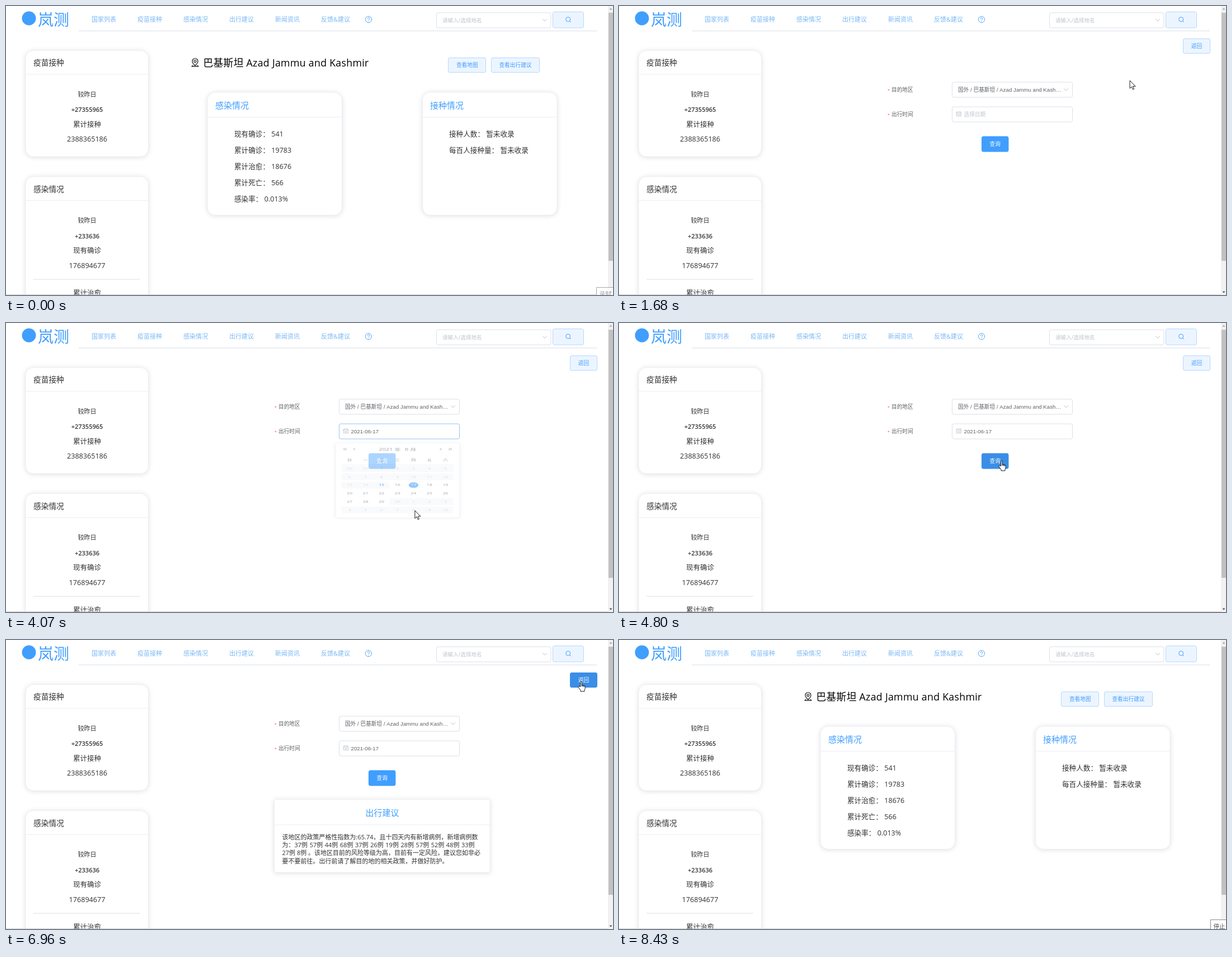
Recreate the animation shown at these times as an HTML page. Size 1085 by 516 pixels, loop 8500 ms.

```html
<!DOCTYPE html>
<html lang="zh-CN">
<head>
<meta charset="utf-8">
<style>
html, body { margin: 0; width: 100%; height: 100%; overflow: hidden; background: #fff; }
svg { display: block; width: 1085px; height: 516px; }
text { font-family: "Open Sans", "Noto Sans CJK SC", "Noto Sans CJK", sans-serif; white-space: pre; }
.arial { font-family: "Liberation Sans", "Noto Sans CJK SC", "Noto Sans CJK", sans-serif; }
.card { fill: #fff; stroke: #ebeef5; filter: drop-shadow(0 1.4px 4.3px rgba(0,0,0,.12)); }
.icon { fill: none; stroke-linecap: round; stroke-linejoin: round; }
</style>
</head>
<body>
<svg id="stage" viewBox="0 0 1085 516"></svg>
<script>
const LOOP = 8500;
const BLUE = '#409eff', HOVER = '#66b1ff', PRESS = '#3a8ee6';
const INK = '#303133', GREY = '#606266', PALE = '#c0c4cc', EDGE = '#dcdfe6', RULE = '#ebeef5';
const stage = document.getElementById('stage');
const $ = id => document.getElementById(id);

// Text placed by its vertical centre
const text = (s, x, cy, size, fill = INK, extra = '') =>
  `<text x="${x}" y="${(cy + size * .37).toFixed(2)}" font-size="${size}" fill="${fill}" ${extra}>${s}</text>`;
const mid = (s, x, cy, size, fill, extra = '') => text(s, x, cy, size, fill, 'text-anchor="middle" ' + extra);
const rect = (x, y, w, h, r, fill, stroke = 'none', extra = '') =>
  `<rect x="${x}" y="${y}" width="${w}" height="${h}" rx="${r}" fill="${fill}" stroke="${stroke}" ${extra}/>`;
const rule = (x1, x2, y, color) => `<path d="M${x1} ${y}H${x2}" stroke="${color}"/>`;
const icon = (d, color, width = 1) => `<path class="icon" d="${d}" stroke="${color}" stroke-width="${width}"/>`;
const group = (id, body) => `<g id="${id}">${body}</g>`;
const card = (x, y, w, h, r, head) =>
  `<rect class="card" x="${x}" y="${y}" width="${w}" height="${h}" rx="${r}"/>` + rule(x, x + w, y + head, RULE);

const buttons = {
  advice: [867.5, 92.5, 86, 26, '查看出行建议'],
  back: [1008.5, 58.5, 48, 26, '返回'],
  query: [648.5, 233, 47.5, 27, '查询']
};
const button = id => {
  const [x, y, w, h, label] = buttons[id];
  return group(id, rect(x, y, w, h, 2.5, '#ecf5ff', '#b3d8ff') +
    mid(label, x + w / 2, y + h / 2 - .3, 9.7, BLUE));
};

function header() {
  const names = ['国家列表', '疫苗接种', '感染情况', '出行建议', '新闻资讯', '反馈&amp;建议'];
  return `<circle cx="41" cy="22" r="12.5" fill="${BLUE}"/>` +
    text('岚测', 57, 25, 28, BLUE, 'font-weight="500"') +
    names.map((s, i) => text(s, 153 + 82 * i, 23.5, 11, '#79b8f5')).join('') +
    `<circle cx="648" cy="24" r="5.6" fill="none" stroke="#5aa9f5"/>` +
    icon('M646.3 22.6a1.8 1.8 0 1 1 2.6 1.6q-.9.5-.9 1.3M648 27.2v.1', '#5aa9f5') +
    rule(130, 1056, 44.5, EDGE) +
    rect(769.5, 12, 204.5, 27, 3, '#fff', EDGE) +
    text('请输入/选择地名', 780, 25.5, 9.6, PALE) +
    icon('M959.5 23.5l3.5 3.5l3.5-3.5', PALE) +
    rect(977.5, 10.5, 55, 28.5, 3, '#ecf5ff', '#b3d8ff') +
    `<circle cx="1004.7" cy="23.8" r="4" fill="none" stroke="${BLUE}"/>` + icon('M1007.7 26.8l2 2', BLUE);
}

function sidebar() {
  const block = (y, title, delta, label, total) =>
    text(title, 49, y + 21.7, 13.7) + mid('较昨日', 145, y + 78, 11) +
    mid(delta, 145, y + 105.5, 11, INK, 'font-weight="600"') +
    mid(label, 145, y + 131.5, 12.5) + mid(total, 145, y + 158, 12.6);
  return card(35, 79.5, 219.5, 189.5, 14, 42.5) + block(79.5, '疫苗接种', '+27355965', '累计接种', '2388365186') +
    card(35, 304.5, 219.5, 260, 14, 43) + block(305, '感染情况', '+233636', '现有确诊', '176894677') +
    rule(49, 240, 488, EDGE) + mid('累计治愈', 145, 512.7, 12.5);
}

function detail() {
  const rows = ['现有确诊： 541', '累计确诊： 19783', '累计治愈： 18676', '累计死亡： 566', '感染率： 0.013%'];
  const shots = ['接种人数： 暂未收录', '每百人接种量： 暂未收录'];
  const list = (items, x) => items.map((s, i) => text(s, x, 228.3 + 28.9 * i, 12.6)).join('');
  return icon('M338 106.5q-5-4.5-5-8a5 5 0 0 1 10 0q0 3.5-5 8zM334 106.5q-2 .5-2 1.3h12q0-.8-2-1.3', '#111', 1.2) +
    `<circle cx="338" cy="98.5" r="2" fill="none" stroke="#111" stroke-width="1.1"/>` +
    text('巴基斯坦 Azad Jammu and Kashmir', 352.5, 101.5, 17.8, '#000', 'letter-spacing=".27"') +
    rect(790.5, 92.5, 67, 26, 2.5, '#ecf5ff', '#b3d8ff') + mid('查看地图', 824.3, 105.2, 9.7, BLUE) +
    button('advice') +
    card(360, 154, 240.5, 219.5, 14, 44.5) + text('感染情况', 374, 177.5, 15, BLUE) + list(rows, 408) +
    card(744.5, 154, 240.5, 219.5, 14, 44.5) + text('接种情况', 758, 177.5, 15, BLUE) + list(shots, 792);
}

function form() {
  const label = (s, cy) => text('*', 480, cy + 1, 9.7, '#f56c6c', 'class="arial"') + text(s, 487, cy, 9.7, GREY);
  const advice = [
    '该地区的政策严格性指数为:65.74，且十四天内有新增病例，新增病例数',
    '为：37例 57例 44例 68例 37例 26例 19例 28例 57例 52例 48例 33例',
    '27例 8例 。该地区目前的风险等级为高，目前有一定风险，建议您如非必',
    '要不要前往。出行前请了解目的地的相关政策，并做好防护。'
  ];
  return button('back') + label('目的地区', 149) + label('出行时间', 193) +
    rect(595.5, 136, 215, 27, 3, '#fff', EDGE) +
    text('国外 / 巴基斯坦 / Azad Jammu and Kash…', 606, 149.2, 9.7, GREY, 'class="arial"') +
    icon('M795.5 147.5l3.5 3.5l3.5-3.5', PALE) +
    rect(595.5, 180, 215, 27, 3, '#fff', EDGE, 'id="field"') +
    icon('M603.5 189.5h8v7h-8zM603.5 192h8M605.5 188.5v1.5M609.5 188.5v1.5M605.5 194.3h4', PALE, .9) +
    text('选择日期', 616.5, 193, 9.7, PALE, 'id="hint"') +
    text('2021-06-17', 616.5, 193, 9.7, GREY, 'id="date" class="arial"') +
    button('query') +
    group('result', card(479.5, 284.5, 385.5, 130.5, 3, 45.5) + mid('出行建议', 672.5, 308.5, 15, BLUE) +
      advice.map((s, i) => text(s, 493.5, 351.6 + 14.3 * i, 11, INK, i == 1 ? 'word-spacing=".7"' : '')).join('')) +
    group('picker', calendar());
}

const COL = 28.57, ROW = 26;
const blocked = i => i < 17 || i > 30;
function calendar() {
  let s = `<rect class="card" x="589.5" y="214.5" width="221" height="234.5" rx="3"/>` +
    `<path d="M621 215l6-5.5l6 5.5" fill="#fff" stroke="${RULE}"/>` +
    text('2021 年', 666.5, 234, 11, GREY) + text('6 月', 713, 234, 11, GREY) +
    icon('M605.5 231l-2.5 2.8l2.5 2.8M608.5 231l-2.5 2.8l2.5 2.8M623.5 231l-2.5 2.8l2.5 2.8' +
      'M776 231l2.5 2.8l-2.5 2.8M791.5 231l2.5 2.8l-2.5 2.8M794.5 231l2.5 2.8l-2.5 2.8', GREY, .9) +
    rule(600, 800, 282, RULE);
  [...'日一二三四五六'].forEach((d, i) => s += mid(d, 614 + COL * i, 268, 8.6, GREY));
  for (let i = 0; i < 42; i++) {
    const x = 614.2 + COL * (i % 7), y = 295 + ROW * Math.floor(i / 7);
    const day = i < 2 ? 30 + i : i < 32 ? i - 1 : i - 31;
    if (blocked(i)) s += rect(x - COL / 2, y - 10.5, COL + .1, 21, 0, '#f5f7fa');
    if (i == 18) s += `<circle id="pick" cx="${x}" cy="${y}" r="8.6" fill="${BLUE}"/>`;
    s += mid(day, x, y, 8.6, i == 16 ? BLUE : blocked(i) ? PALE : GREY,
      `id="day${i}"` + (i == 16 ? ' font-weight="700"' : ''));
  }
  return s;
}

const frame = rect(1076, 0, 9, 516, 0, '#f1f1f1') + rect(1077, 12, 8, 443, 0, '#c1c1c1', 'none', 'id="thumb"') +
  '<path d="M1078.5 6.5l2.5-3l2.5 3z" fill="#a3a3a3"/><path d="M1078.5 509.5l2.5 3l2.5-3z" fill="#505050"/>' +
  rule(0, 1076, 515.5, '#cfcfcf');
const tip = (id, x, y, label, color) =>
  group(id, rect(x + .5, y + .5, 40, 30, 0, '#fff', '#8a8a8a') + text(label, x + 5.5, y + 12, 10.5, color));
const outline = 'fill="#fff" stroke="#000" stroke-width=".9" stroke-linejoin="round"';
const pointer = group('pointer',
  `<path id="arrow" d="M0 0V14L3.2 11L5.4 16L7.6 15L5.4 10.3H10Z" ${outline}/>` +
  `<g id="hand" ${outline}><path d="M-1.2 9V1.2a1.2 1.2 0 0 1 2.4 0V6.5l4.2 .9q1.8 .5 1.8 2.2v3l-1.2 3v2.2h-7v-2l-3.6-5q-1-1.6 .2-2.2 1-.4 2.2 1z"/>` +
  `<path d="M1.2 6.5V9M3.2 7V9.3M5.2 7.4V9.8"/></g>` +
  `<path id="beam" d="M-2.5 -8h2q.5 0 .5 .5q0-.5 .5-.5h2M0 -7.5V7.5M-2.5 8h2q.5 0 .5-.5q0 .5 .5 .5h2" fill="none" stroke="#000"/>`);

stage.innerHTML = '<rect width="1085" height="516" fill="#fff"/>' + header() + sidebar() +
  group('detail', detail()) + group('form', form()) + frame +
  tip('record', 1055, 502, '录制', '#8a8a8a') + tip('stop', 1057, 499, '停止', '#555') + pointer;

// Pointer hot spot: time, x, y
const path = [
  [70, 1072, 512], [200, 1080, 430], [330, 1050, 310], [600, 955, 165], [870, 905, 108],
  [1140, 905, 109], [1680, 913, 133], [1800, 920, 140], [1870, 916, 142], [2260, 769, 187],
  [2400, 769, 187], [2990, 699, 283], [3200, 714, 318], [3500, 748, 362], [3740, 730, 350],
  [3940, 730, 350], [4070, 731, 335], [4740, 684, 246], [5080, 684, 246], [5500, 860, 325],
  [5830, 998, 374], [5960, 1004, 249], [6300, 1014, 160], [6800, 1028, 74], [7400, 1028, 74],
  [7700, 1050, 220], [8170, 1071, 520]
];
function locate(t) {
  const n = path.findIndex(p => p[0] > t);
  const [t0, x0, y0] = path[n < 1 ? 0 : n - 1], [t1, x1, y1] = path[n < 1 ? 0 : n];
  const k = t1 > t0 ? (t - t0) / (t1 - t0) : 0;
  return [x0 + (x1 - x0) * k, y0 + (y1 - y0) * k];
}

const clamp = v => Math.max(0, Math.min(1, v));
// cubic-bezier(.23, 1, .32, 1)
function ease(x) {
  let a = 0, b = 1;
  for (let i = 0; i < 20; i++) {
    const u = (a + b) / 2, v = 1 - u;
    if (.69 * u * v * v + .96 * u * u * v + u ** 3 < x) a = u; else b = u;
  }
  return x <= 0 ? 0 : x >= 1 ? 1 : 1 - (1 - a) ** 3;
}
const mix = (from, to, k) => {
  const part = (c, i) => parseInt(c.slice(i, i + 2), 16);
  return `rgb(${[1, 3, 5].map(i => Math.round(part(from, i) + (part(to, i) - part(from, i)) * k))})`;
};

const show = (id, on) => $(id).setAttribute('visibility', on ? 'inherit' : 'hidden');
const set = (el, attrs) => Object.entries(attrs).forEach(([k, v]) => el.setAttribute(k, v));
function paint(id, fill, stroke, ink) {
  const [box, label] = $(id).children;
  set(box, { fill, stroke });
  set(label, { fill: ink });
}

const OPEN = 2430, CLOSE = 4038;
function draw(t) {
  const [x, y] = locate(t);
  const inside = ([bx, by, w, h]) => x >= bx && x <= bx + w && y >= by && y <= by + h;
  const onDetail = t < 1070 || t >= 7160, onForm = t >= 1140 && t < 7100;
  show('detail', onDetail);
  show('form', onForm);

  const open = ease((t - OPEN) / 300) * (1 - ease((t - CLOSE) / 300));
  const live = onForm && t >= OPEN && t < CLOSE;
  show('picker', onForm && open > .002);
  set($('picker'), { opacity: open, transform: `translate(0 ${214 * (1 - open)}) scale(1 ${Math.max(open, .001)})` });

  const picked = t >= 3800;
  show('hint', onForm && !picked);
  show('date', onForm && picked);
  show('pick', onForm && open > .002 && picked);
  const col = Math.floor((x - 600) / COL), row = Math.floor((y - 282) / ROW);
  const inGrid = live && col >= 0 && col < 7 && row >= 0 && row < 6;
  for (let i = 17; i < 31; i++) {
    const hot = inGrid && i == row * 7 + col;
    set($('day' + i), { fill: i == 18 && picked ? '#fff' : hot ? BLUE : GREY });
  }

  const focus = clamp((t - 2390) / 200) * (1 - clamp((t - 3960) / 200));
  set($('field'), { stroke: mix(EDGE, BLUE, focus) });
  show('result', onForm && t >= 4870);

  const overAdvice = onDetail && t < 1070 && inside(buttons.advice);
  const overBack = onForm && inside(buttons.back);
  const overQuery = onForm && t > 4300 && inside(buttons.query);
  const plain = (id, over, down) => {
    const c = down ? PRESS : BLUE;
    over ? paint(id, c, c, '#fff') : paint(id, '#ecf5ff', '#b3d8ff', BLUE);
  };
  plain('advice', overAdvice, t >= 1000);
  plain('back', overBack, t >= 6950);
  const held = t >= 4800 && t < 4870;
  const lit = overQuery || t >= 4800 ? 1 - clamp((t - 6860) / 100) : 0;
  const tone = held ? PRESS : mix(BLUE, HOVER, lit);
  paint('query', tone, tone, '#fff');

  const shown = t >= 70 && t < 8170;
  set($('thumb'), { fill: shown && x >= 1077 && y < 455 ? '#a8a8a8' : '#c1c1c1' });
  show('record', t < 130);
  show('stop', t >= 8370);
  set($('record'), { opacity: .75 });
  set($('stop'), { opacity: t < 8430 ? .6 : 1 });

  const hand = overAdvice || overBack || overQuery || inGrid;
  const beam = !hand && onForm && t < 3000 && inside([595.5, 180, 215, 27]);
  show('hand', shown && hand);
  show('beam', shown && beam);
  show('arrow', shown && !hand && !beam);
  set($('pointer'), { transform: `translate(${x.toFixed(1)} ${y.toFixed(1)})` });
}

const start = performance.now();
function tick() {
  draw((performance.now() - start) % LOOP);
  requestAnimationFrame(tick);
}
tick();
</script>
</body>
</html>
```
